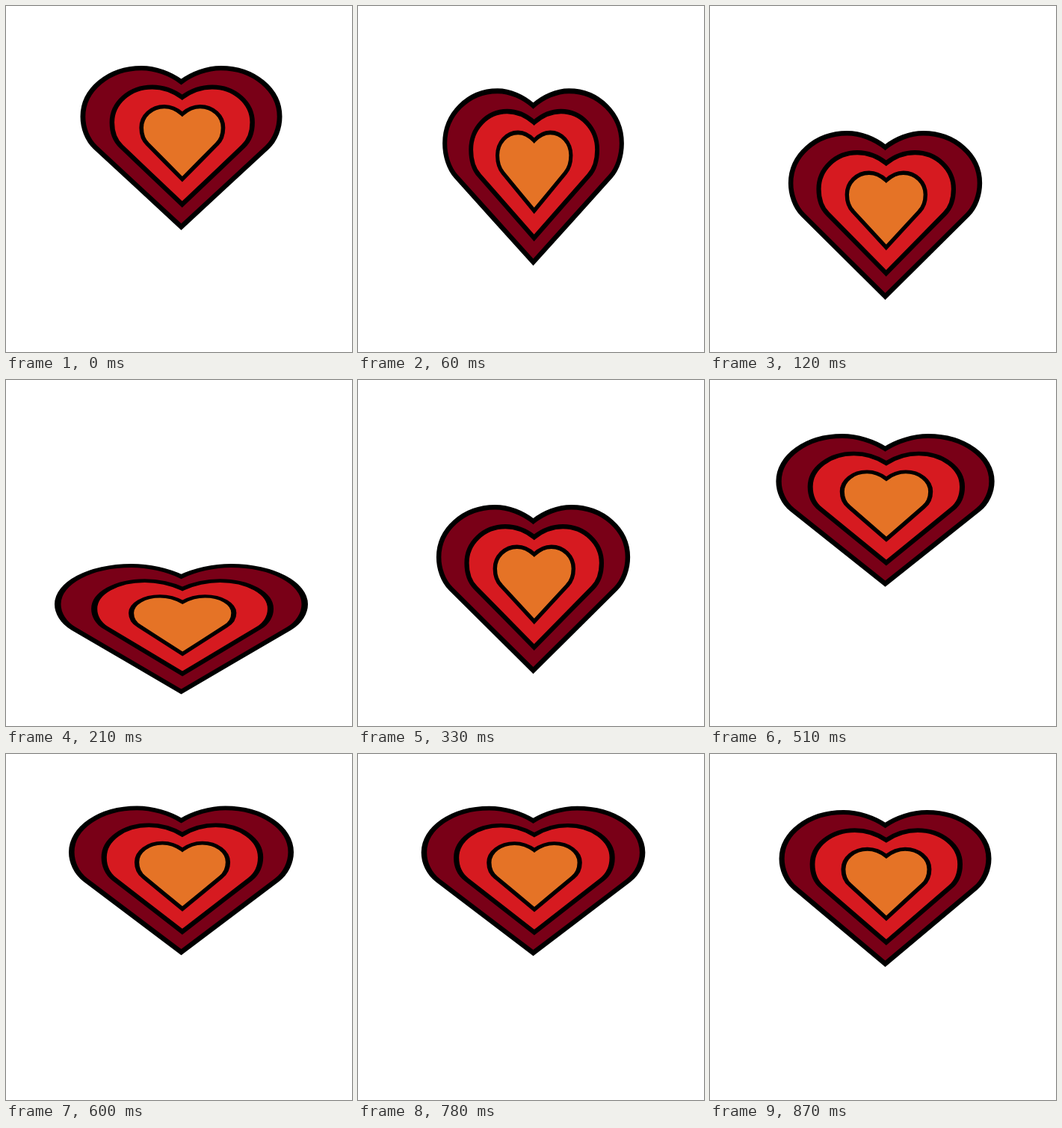
Recreate the animation shown at these times as an HTML page with a canvas. Size 463 by 463 pixels, loop 0.9 s.

```html
<!DOCTYPE html>
<html lang="en">
<head>
<meta charset="utf-8">
<title>Bouncing heart</title>
<style>
  html, body { margin: 0; width: 100%; height: 100%; overflow: hidden; background: #fff; }
  canvas { display: block; }
</style>
</head>
<body>
<canvas id="stage" width="463" height="463"></canvas>
<script>
const ctx = document.getElementById('stage').getContext('2d');
const SIZE = 463, STEP = 30, STEPS = 30, APEX = 22.5;

// Geometry at rest; its outer bounds are REST.
const REST = { x: 234.5, width: 259.3, top: 167, bottom: 393.2 };
const HEARTS = [
  { cx: 234.5, w: 126.4, lobe: 51, top: 170.2, notch: 189, side: 237, sx: 110.3, sy: 279.3, tip: 388.6, line: 6.5, fill: '#790017' },
  { cx: 235.7, w: 90.2, lobe: 38.5, top: 196.2, notch: 210.3, side: 245, sx: 78.3, sy: 278, tip: 357.6, line: 6.2, fill: '#d61a20' },
  { cx: 235.8, w: 52.5, lobe: 23, top: 223.2, notch: 233.4, side: 252.3, sx: 44.3, sy: 275, tip: 323, line: 5.4, fill: '#e57326' }
];

// Poses by distance in steps from the apex: [distance, width, top, bottom]
const POSES = [
  [-2.5, 301, 69.5, 269.2],
  [2.5, 301, 69.5, 269.2],
  [4.5, 297, 70.5, 272.6],
  [6.5, 284, 75, 285],
  [7.5, 270, 80, 300],
  [8.5, 250, 90, 322.8],
  [11.5, 259.3, 167, 393.2],
  [14.5, 339, 246, 420.5],
  [15.5, 339, 246, 420.5]
];

// Cubic Hermite interpolation with weighted finite-difference tangents.
function slope(i, c) {
  if (i === 0 || i === POSES.length - 1) return 0;
  const [a, b, n] = [POSES[i - 1], POSES[i], POSES[i + 1]];
  const h1 = b[0] - a[0], h2 = n[0] - b[0];
  return (h2 * (b[c] - a[c]) / h1 + h1 * (n[c] - b[c]) / h2) / (h1 + h2);
}

function poseAt(d) {
  let i = 0;
  while (d > POSES[i + 1][0]) i++;
  const a = POSES[i], b = POSES[i + 1], h = b[0] - a[0], u = (d - a[0]) / h;
  return [1, 2, 3].map(c => {
    const m0 = i === 0 ? 0 : slope(i, c) * h;
    const m1 = i === 0 ? 0 : slope(i + 1, c) * h;
    const e = u * u * (3 - 2 * u);
    return a[c] + (b[c] - a[c]) * e + m0 * u * (1 - u) ** 2 - m1 * u * u * (1 - u);
  });
}

function drawHeart(s) {
  const drop = s.sy - s.side, rise = s.notch - s.top, height = s.side - s.top;
  const path = new Path2D();
  for (const m of [-1, 1]) {
    const x = v => s.cx + m * v;
    const points = [
      [0, s.notch],
      [s.lobe * 0.28, s.notch - rise * 0.6], [s.lobe * 0.65, s.top], [s.lobe, s.top],
      [s.lobe + (s.w - s.lobe) * 0.56, s.top], [s.w, s.side - height * 0.55], [s.w, s.side],
      [s.w, s.side + drop * 0.36], [s.sx + drop * 0.25, s.sy - drop * 0.25], [s.sx, s.sy],
      [s.sx * 2 / 3, s.sy + (s.tip - s.sy) / 3], [s.sx / 3, s.tip - (s.tip - s.sy) / 3], [0, s.tip]
    ];
    if (m > 0) points.reverse();
    else path.moveTo(s.cx, s.notch);
    for (let i = 1; i < points.length; i += 3) {
      const [p, q, r] = points.slice(i, i + 3);
      path.bezierCurveTo(x(p[0]), p[1], x(q[0]), q[1], x(r[0]), r[1]);
    }
  }
  path.closePath();
  ctx.fillStyle = s.fill;
  ctx.lineWidth = s.line;
  ctx.fill(path);
  ctx.stroke(path);
}

function render(ms) {
  const step = Math.floor(ms / STEP) % STEPS;
  const gap = Math.abs(step - APEX);
  const [width, top, bottom] = poseAt(Math.min(gap, STEPS - gap));
  const scaleX = width / REST.width;
  const scaleY = (bottom - top) / (REST.bottom - REST.top);

  ctx.setTransform(1, 0, 0, 1, 0, 0);
  ctx.fillStyle = '#fff';
  ctx.fillRect(0, 0, SIZE, SIZE);
  ctx.translate(REST.x, top);
  ctx.scale(scaleX, scaleY);
  ctx.translate(-REST.x, -REST.top);
  ctx.strokeStyle = '#000';
  ctx.lineJoin = 'miter';
  HEARTS.forEach(drawHeart);
}

const start = performance.now();
function tick() {
  render(performance.now() - start);
  requestAnimationFrame(tick);
}
tick();
</script>
</body>
</html>
```
